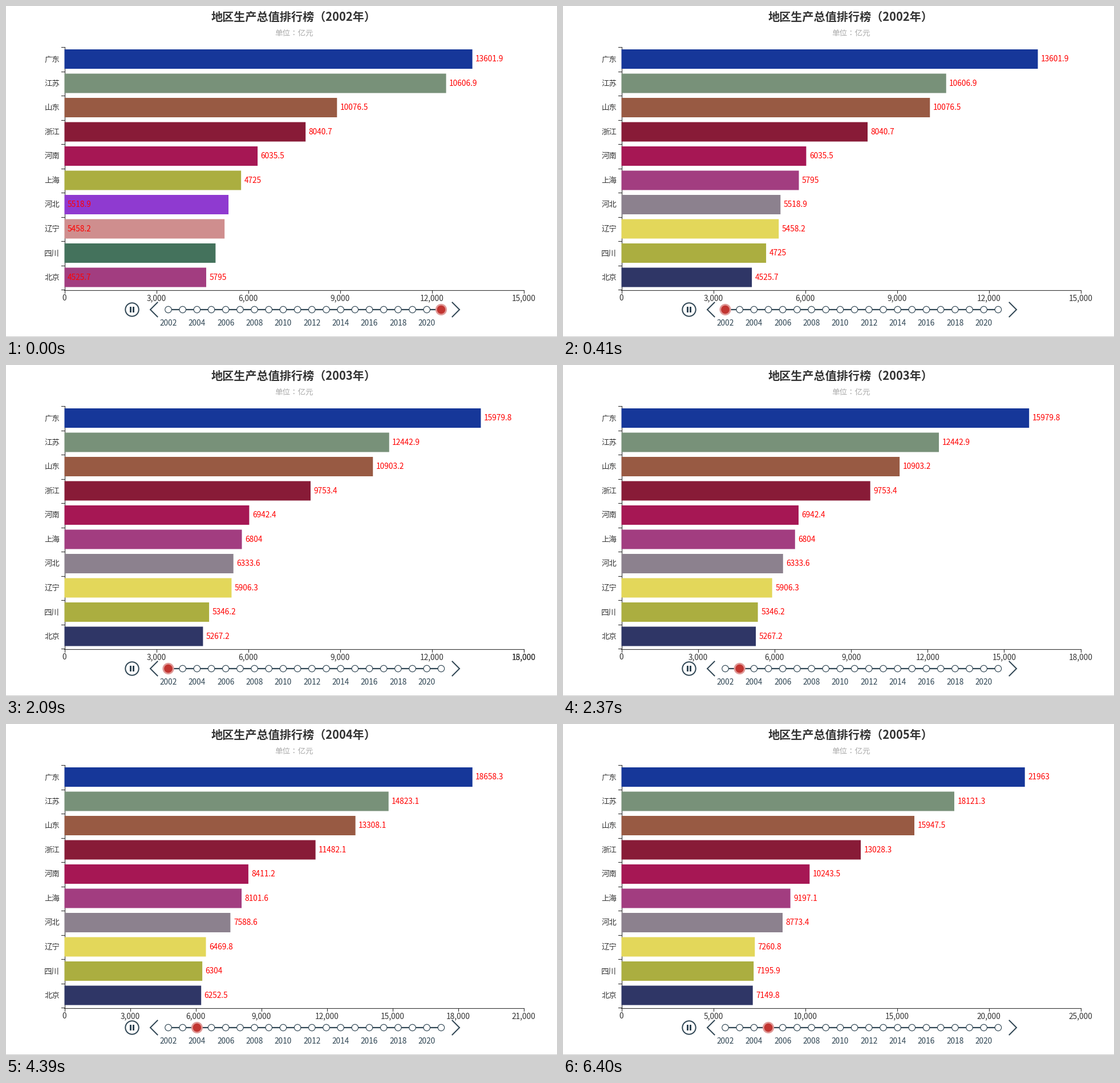
Recreate the animation shown at these times as a matplotlib script. Size 966 px wide and 580 px high, loop 8000 ms.

```python
import matplotlib.pyplot as plt
from matplotlib.animation import FuncAnimation
from matplotlib.patches import Circle, Rectangle

W, H = 966, 580
LOOP, INTERVAL = 8000, 40
STEP, LAG = 69, 5              # screen refresh and start delay, in ms
LEFT, SPAN = 102.5, 805        # value axis
TOP, BAND, BAR = 71.75, 42.5, 34
BOTTOM = 497.5
RAIL_X, RAIL_Y, RAIL_GAP = 284.5, 532, 25.18
DARK, SLATE, ACCENT = "#333333", "#304654", "#c23531"

plt.rcParams["font.family"] = ["Noto Sans CJK JP"]

# Bars in painting order, back to front.
COLORS = {
    "广东": "#163799", "江苏": "#789179", "山东": "#985a43", "浙江": "#881b37",
    "河南": "#a61754", "四川": "#abae40", "湖北": "#8f3ad0", "福建": "#cf8e8e",
    "湖南": "#44725c", "上海": "#a23d80", "河北": "#8c818e", "辽宁": "#e3d75a",
    "北京": "#2f3666",
}
RANKED = "广东 江苏 山东 浙江 河南 上海 河北 辽宁 四川 北京".split()
RANKED_LAST = "广东 江苏 山东 浙江 河南 四川 湖北 福建 湖南 上海".split()


class Year:
    def __init__(self, year, limit, tick, values, names=RANKED):
        self.year = year
        self.values = dict(zip(names, values))
        self.rows = {name: row for row, name in enumerate(names)}
        self.widths = {n: v / limit * SPAN for n, v in self.values.items()}
        self.ticks = {v: LEFT + v / limit * SPAN
                      for v in range(0, limit + 1, tick)}


YEARS = [
    Year(2021, 140000, 20000, [124369.7, 116364.2, 83095.9, 73515.8, 58887.4,
                               53850.8, 50012.9, 48810.4, 46063.1, 43214.9],
         RANKED_LAST),
    Year(2002, 15000, 3000, [13601.9, 10606.9, 10076.5, 8040.7, 6035.5,
                             5795, 5518.9, 5458.2, 4725, 4525.7]),
    Year(2003, 18000, 3000, [15979.8, 12442.9, 10903.2, 9753.4, 6942.4,
                             6804, 6333.6, 5906.3, 5346.2, 5267.2]),
    Year(2004, 21000, 3000, [18658.3, 14823.1, 13308.1, 11482.1, 8411.2,
                             8101.6, 7588.6, 6469.8, 6304, 6252.5]),
    Year(2005, 25000, 5000, [21963, 18121.3, 15947.5, 13028.3, 10243.5,
                             9197.1, 8773.4, 7260.8, 7195.9, 7149.8]),
]
STARTS = [0, 2090, 4040, 6060]


def progress(elapsed, duration):
    return min(max(elapsed / duration, 0), 1)


def cubic_out(p):
    return 1 - (1 - p) ** 3


def expo_out(p):
    return 1 if p == 1 else 1 - 2 ** (-10 * p)


def quintic_in_out(p):
    return 16 * p ** 5 if p < 0.5 else 1 - 16 * (1 - p) ** 5


def lerp(a, b, p):
    return a + (b - a) * p


fig = plt.figure(figsize=(W / 72, H / 72), dpi=72, facecolor="white")
ax = fig.add_axes([0, 0, 1, 1])
ax.set_xlim(0, W)
ax.set_ylim(H, 0)
ax.axis("off")


def line(xs, ys, color=DARK, width=1.1, z=1, **kw):
    return ax.plot(xs, ys, color=color, lw=width, zorder=z, **kw)[0]


def text(x, baseline, s, size=13.7, color=DARK, ha="center", z=6, **kw):
    return ax.text(x, baseline, s, fontsize=size, color=color, ha=ha,
                   va="baseline", zorder=z, **kw)


def spread(pairs):
    """Join separate segments into one broken line."""
    out = []
    for a, b in pairs:
        out += [a, b, float("nan")]
    return out


def draw_axes():
    line([LEFT, LEFT], [72, BOTTOM])
    line([LEFT - 0.5, LEFT + SPAN + 0.5], [BOTTOM, BOTTOM])
    ticks = [72.3 + BAND * k for k in range(11)]
    line(spread([(97, LEFT)] * 11), spread([(y, y) for y in ticks]))
    for row, name in enumerate(RANKED):
        text(94, TOP + BAND * (row + 0.5) + 4.4, name, 13.4, ha="right")
    text(505, 52, "单位：亿元", 13.5, "#aaaaaa")
    ax.add_patch(Rectangle((0, 578.8), W, 1.2, color="#cccccc", lw=0))


def draw_timeline():
    end = RAIL_X + 19 * RAIL_GAP
    line([RAIL_X, end], [RAIL_Y, RAIL_Y], SLATE, 2.2, 2)
    for k in range(20):
        x = RAIL_X + k * RAIL_GAP
        ax.add_patch(Circle((x, RAIL_Y), 5.7, fc="white", ec=SLATE,
                            lw=1.15, zorder=3))
        if k % 2 == 0:
            text(x, 560.5, str(2002 + k), color=SLATE)
    for tip, back in ((253, 265.5), (795, 782.5)):
        line([back, tip, back], [519.5, RAIL_Y, 544.5], SLATE, 2,
             solid_joinstyle="miter")
    ax.add_patch(Circle((221, RAIL_Y), 11.7, fc="none", ec=SLATE, lw=2))
    for x in (217.2, 222.3):
        ax.add_patch(Rectangle((x, 527), 2.5, 10, fc=SLATE, lw=0))


draw_axes()
draw_timeline()
title = text(359.5, 25.6, "", 20.1, ha="left", weight="bold")
x_ticks = line([], [])
x_labels = [text(0, 516, "") for _ in range(8)]
bars, labels = {}, {}
for order, (name, color) in enumerate(COLORS.items()):
    bars[name] = ax.add_patch(Rectangle((LEFT, 0), 0, BAR, fc=color, lw=0,
                                        zorder=4 + order / 100, snap=False))
    labels[name] = text(0, 0, "", color="#ff0000", ha="left")
halo = ax.add_patch(Circle((0, RAIL_Y), 10.1, fc="#e09a98", lw=0, zorder=7))
pointer = ax.add_patch(Circle((0, RAIL_Y), 7.3, fc=ACCENT, lw=0, zorder=8))


def update_bar(name, old, new, move, grow):
    bar, label = bars[name], labels[name]
    width, row = new.widths.get(name, 0), new.rows.get(name)
    if name not in old.rows:
        width *= 0 if row is None else grow
    else:
        width = lerp(old.widths[name], width, move)
        row = old.rows[name] if row is None else lerp(old.rows[name], row, move)
    bar.set_visible(width > 0)
    label.set_text(f"{new.values[name]:g}" if name in new.values else "")
    if row is None:
        return
    top = TOP + BAND * row + (BAND - BAR) / 2
    bar.set_y(top)
    bar.set_width(width)
    label.set_position((LEFT + width + 5.5, top + BAR / 2 + 4.2))


def update_ticks(old, new, move):
    xs = [lerp(old.ticks.get(v, x), x, move) for v, x in new.ticks.items()]
    x_ticks.set_data(spread([(x, x) for x in xs]),
                     spread([(BOTTOM, BOTTOM + 5)] * len(xs)))
    for label in x_labels:
        label.set_text("")
    for label, value, x in zip(x_labels, new.ticks, xs):
        label.set_text(f"{value:,}")
        label.set_x(x)


def update(frame):
    now = (frame + 0.5) * INTERVAL
    phase = max(k for k, start in enumerate(STARTS) if start <= now)
    elapsed = (now - STARTS[phase]) // STEP * STEP - LAG
    old, new = YEARS[phase], YEARS[phase + 1]
    move = cubic_out(progress(elapsed, 300))
    grow = expo_out(progress(elapsed, 1000))

    title.set_text(f"地区生产总值排行榜（{new.year}年）")
    for name in COLORS:
        update_bar(name, old, new, move, grow)
    update_ticks(old, new, move)
    slide = quintic_in_out(progress(elapsed, 300))
    x = RAIL_X + RAIL_GAP * lerp(old.year - 2002, new.year - 2002, slide)
    for dot in (halo, pointer):
        dot.set_center((x, RAIL_Y))
    return []


anim = FuncAnimation(fig, update, frames=LOOP // INTERVAL, interval=INTERVAL,
                     init_func=lambda: [], repeat=True, repeat_delay=0)
plt.show()
```
